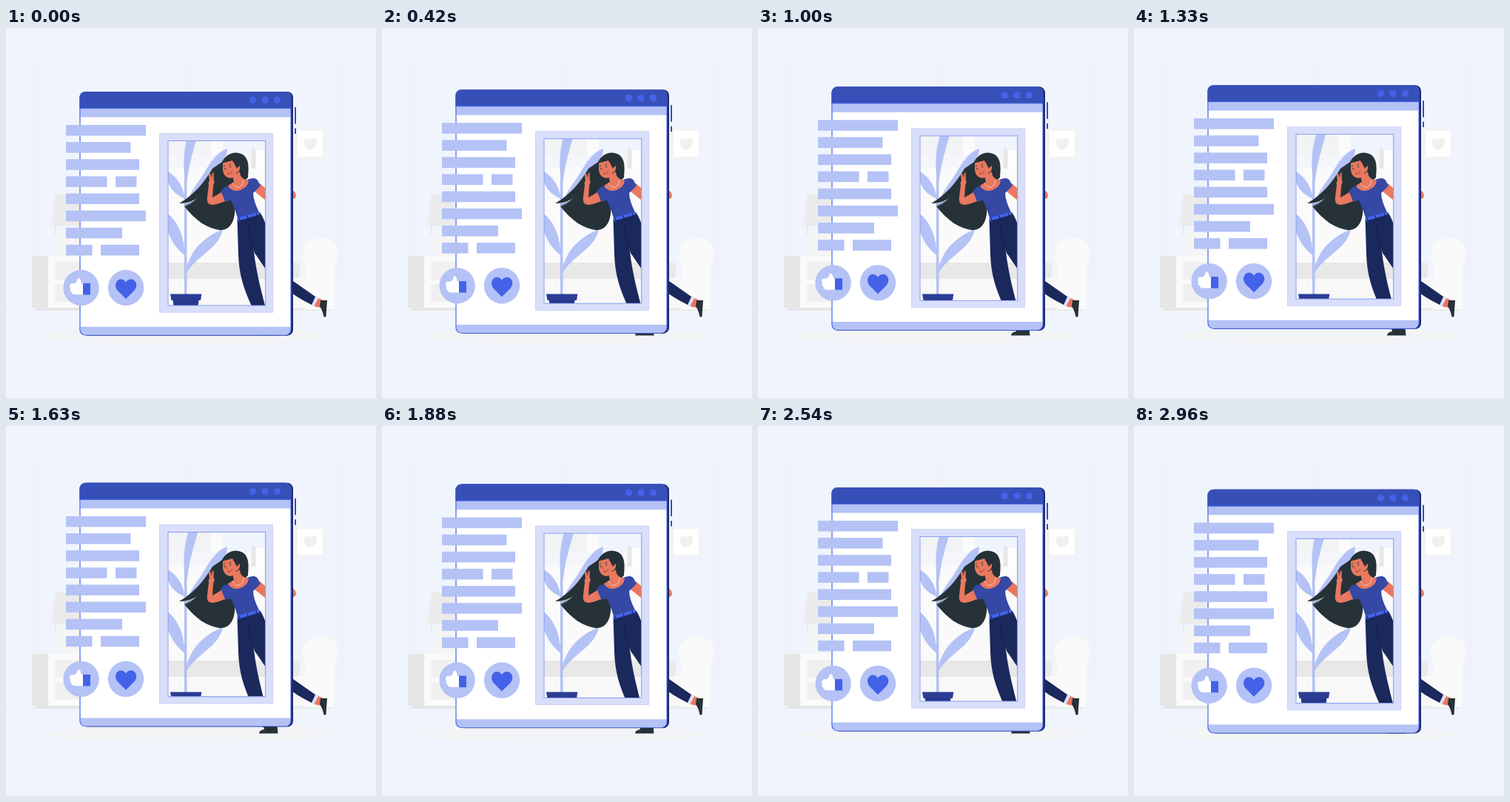
Animation of 500 by 500 pixels, one loop 3000 ms. Source, as an HTML page with a canvas:

```html
<!DOCTYPE html>
<html lang="en">
<head>
<meta charset="utf-8">
<title>Floating profile window</title>
<style>
html, body { margin: 0; width: 100%; height: 100%; overflow: hidden; background: #f0f4fc; }
canvas { display: block; width: 500px; height: 500px; }
</style>
</head>
<body>
<canvas id="stage"></canvas>
<script>
const LOOP = 3000, RISE = 10;
const BLUE = '#4462e8', LIGHT = '#b4c2f6', PALE = '#d9dffa', HEADER = '#3750b8';
const NAVY = '#1a285c', DARK = '#263238', SKIN = '#e8785f', SHIRT = '#3448a4';

const canvas = document.getElementById('stage');
const ctx = canvas.getContext('2d');
const dpr = window.devicePixelRatio || 1;
canvas.width = canvas.height = 500 * dpr;

function rect(x, y, w, h, color) {
  ctx.fillStyle = color;
  ctx.fillRect(x, y, w, h);
}

function round(x, y, w, h, r, color) {
  ctx.fillStyle = color;
  ctx.beginPath();
  ctx.roundRect(x, y, w, h, r);
  ctx.fill();
}

function oval(x, y, rx, ry, color) {
  ctx.fillStyle = color;
  ctx.beginPath();
  ctx.ellipse(x, y, rx, ry, 0, 0, Math.PI * 2);
  ctx.fill();
}

function shape(d, color) {
  ctx.fillStyle = color;
  ctx.fill(new Path2D(d));
}

function line(d, color, width = 1) {
  ctx.strokeStyle = color;
  ctx.lineWidth = width;
  ctx.lineCap = 'round';
  ctx.stroke(new Path2D(d));
}

function drawRoom() {
  rect(0, 0, 500, 500, '#f0f4fc');

  // window on the wall
  for (const x of [36, 241, 449]) rect(x, 53, 11, 295, '#eff2f9');
  rect(36, 53, 425, 2, '#eff2f9');
  rect(0, 380.5, 500, 0.7, '#ebeef4');
  oval(246, 416, 195, 12, '#f3f4f6');

  // shelf and pictures
  round(205, 140, 72, 31, [0, 0, 9, 0], '#f2f3f5');
  rect(277, 140, 16, 31, '#fbfbfc');
  rect(219, 171, 113, 18, '#f4f6fa');
  rect(219, 189, 56, 2, '#fafafa');
  rect(332, 163, 5.5, 39, '#e6e6e6');
  rect(337.5, 165, 40, 36, '#fdfdfd');
  rect(389, 136, 41, 42, '#f3f3f4');
  rect(394, 139, 34, 35, '#ffffff');
  shape('M403 151 Q407 147 411 150 Q416 147 420 151 Q421 158 415 163 Q411 166 407 163 Q401 157 403 151Z', '#f1f1f2');

  // sofa
  round(195, 190, 185, 140, 14, '#fafafa');
  rect(195, 338, 210, 42, '#f8f8f8');
  round(215, 317, 182, 22, 5, '#e8e8e8');
  rect(385, 378, 54, 4, '#ebebeb');
  shape('M404 380 L404 320 C396 298 407 284 425 284 C445 284 454 299 444 320 L443 380Z', '#fafafa');

  // cabinet and lamp
  rect(40, 376, 60, 6, '#e4e5e7');
  rect(35, 308, 23, 70, '#e6e6e6');
  rect(57, 308, 60, 70, '#fafafa');
  rect(66, 316, 45, 24, '#f0f0f0');
  rect(66, 346, 45, 24, '#f0f0f0');
  shape('M72 270 H115 V308 H74 Q66 292 72 270Z', '#f5f5f5');
  shape('M67 225 H110 V267 H61Z', '#ebebeb');
  line('M66.5 267 V279', '#e2e3e5');
}

function drawPlant() {
  shape('M243 206 C239 188 239 166 247 141 L260 141 C255 160 248 178 245 206Z', LIGHT);
  shape('M242 231 C229 225 219 218 214 192 C228 197 239 211 242 231Z', LIGHT);
  shape('M243 246 C246 222 258 213 270 192 C280 175 289 166 299 163 C298 180 285 197 269 216 C259 228 249 233 243 246Z', LIGHT);
  shape('M242 308 C226 294 217 280 212 246 C229 257 240 274 242 308Z', LIGHT);
  shape('M243 333 C246 301 268 282 293 272 C287 300 257 307 243 333Z', LIGHT);
  line('M242.8 190 V360', LIGHT, 3.4);
  line('M241.5 190 V360', '#a3b3ed', 0.5);
  shape('M225.5 367 H260.5 L257 397 H229Z', '#27378c');
  shape('M222 359.5 H264.3 L263 368 H223.5Z', '#2b3c94');
}

function drawLegs() {
  // trailing leg
  shape('M416 376 L422 365 L429 368 L425 378Z', SKIN);
  shape('M425 368 L434 368 Q433 380 432.5 390 L429.5 390.5 Q428 382 424 376Z', DARK);
  shape('M411 374 L417 362 L422 364 Q418 368 417 376Z', PALE);
  shape('M327 262 L343 249 C354 264 359 300 371 331 Q377 337 388 342 L418 363 L413 374 Q391 363 384 356 Q365 344 351 326 L336 304Z', NAVY);

  // standing leg
  shape('M348 406 L366.5 406 L367.5 415.5 L342 415.5 Q342 411 349 410Z', DARK);
  shape('M312.5 258 L341 250 Q334 270 334 291 C336 320 343 348 350 375 L363 407 H347 L331.5 375 C321 351 315 334 314 306Z', NAVY);
  line('M327 268 Q329 285 335 299 L338 306', '#101a44', 0.9);
}

function drawWoman() {
  drawLegs();

  // hair
  shape('M292 181 C297 170 310 165 320 171 C329 177 328 190 327 202 Q323 207 318 206 L309 238 C311 261 303 274 288 273 C271 270 257 261 241 241 Q250 238 257 231 Q246 237 234 237 C255 225 269 207 279 190Z', DARK);
  line('M242 239 Q253 236 260 228', '#46525b', 0.6);

  // far arm and hand
  shape('M335 220 L343 210 Q351 217 362 226 L385 219 Q391 219 392 227 Q391 232 385 231 L365 239 Q353 235 346 229Z', SKIN);

  // torso
  shape('M300 213 L329 204 Q337 201 340 206 L344 213 L334 223 Q334 233 342 249 L313 257 Q310 246 304 233 L296 235 L289 230 Q288 217 300 213Z', SHIRT);
  shape('M312.5 256.5 L342 248 L343.5 252 L313 261Z', BLUE);
  for (const x of [315, 326, 338]) line(`M${x} ${346.5 - x * 0.285} l1.2 4`, NAVY, 1.1);

  // neck and chest
  shape('M300 213 L308 208 L306 200 L316 194 Q316 204 328 206 Q327 216 314 220 Q304 221 300 213Z', SKIN);
  line('M306 210 Q310 217 315 215 Q320 213 321 206', '#f7dce0', 0.8);

  // waving arm
  shape('M296 234 Q284 239 278 239 Q270 238 272 228 L274 212 Q273 208 275 206 L274 198 Q275 195 277 199 L278 203 L278.5 196.5 Q280 194 280.7 197 L280.5 205 Q283 207 280 213 L279 229 L291 222Z', SKIN);

  // face
  shape('M293 183 Q299 177 306 179 L312 188 Q315 183 316 188 Q316 194 312 195 Q309 202 303 203 Q295 202 293 193Z', SKIN);
  shape('M291 183 Q298 175 309 175 L318 183 L312 190 Q309 184 306 179 Q299 181 291 183Z', DARK);
  oval(296, 190, 0.8, 1, DARK);
  oval(303.2, 187.2, 0.8, 1, DARK);
  line('M294 187.3 L296 186.2 M301.5 184.6 L304 184', DARK, 0.7);
  line('M299 189 L298.4 193 L300 193', '#b94f47', 0.6);
  line('M299.5 197 Q303.5 197.5 305.5 193.8', '#8d3335', 0.9);
}

function drawPanel() {
  ctx.save();
  const mask = new Path2D('M0 -50 H500 V550 H0Z M219 152.5 H350.7 V375 H219Z');
  ctx.clip(mask, 'evenodd');

  // window body
  round(102, 86, 286, 329.7, 8, '#1d2c70');
  round(99.3, 86, 286.2, 329.5, 8, BLUE);
  round(100.4, 86.4, 284.2, 328.3, 7.5, LIGHT);
  round(99.4, 86, 286, 22.5, [8, 8, 0, 0], HEADER);
  rect(100, 108, 285, 1, BLUE);
  rect(101, 120.5, 283.2, 283.2, '#ffffff');
  rect(99.3, 120, 1.2, 284, '#91a5f2');
  for (const x of [333.5, 350, 366.5]) oval(x, 97.5, 4.7, 4.7, BLUE);
  rect(390, 107, 2, 22.5, HEADER);
  rect(390, 135.5, 2, 7.5, HEADER);

  // picture frame
  rect(207, 142.3, 154, 242.2, PALE);
  ctx.strokeStyle = '#c5cef7';
  ctx.lineWidth = 0.7;
  ctx.strokeRect(207.4, 142.7, 153.2, 241.4);
  ctx.restore();

  ctx.strokeStyle = '#8298ef';
  ctx.lineWidth = 0.9;
  ctx.strokeRect(219, 152.5, 131.7, 222.5);

  // text lines as [start, end] pairs
  const rows = [[81, 189], [81, 168.5], [81, 180], [81, 136.5, 148, 176.5],
    [81, 180], [81, 189], [81, 157], [81, 116.5, 128, 180]];
  rows.forEach((row, i) => {
    for (let k = 0; k < row.length; k += 2) {
      rect(row[k], 131 + i * 23.13, row[k + 1] - row[k], 14.5, LIGHT);
    }
  });

  // reactions
  oval(101.6, 351, 24.2, 24.2, LIGHT);
  oval(162, 351, 24.2, 24.2, LIGHT);
  shape('M104 346 Q101 345 101 341 Q99 336 96.5 339.5 Q96 344 92 345.5 Q86 344.5 86.5 348 Q85 350 87 352 Q85.5 355 88.5 356.5 Q88.5 360.5 94 360.3 H104Z', '#ffffff');
  rect(104, 345, 10, 15.5, BLUE);
  shape('M162 366 L150.5 354.5 C146 349 148 341 154 339.5 Q159 339 162 343.5 Q165 339 170 339.5 C176.5 341 178.5 349 173.5 354.5Z', BLUE);
}

function frame(now) {
  const p = (now % LOOP) / LOOP;
  const lift = RISE * (1 - Math.abs(1 - 2 * p));
  ctx.setTransform(dpr, 0, 0, dpr, 0, 0);
  drawRoom();
  drawPlant();
  drawWoman();
  ctx.translate(0, -lift);
  drawPanel();
  requestAnimationFrame(frame);
}

frame(performance.now());
</script>
</body>
</html>
```
